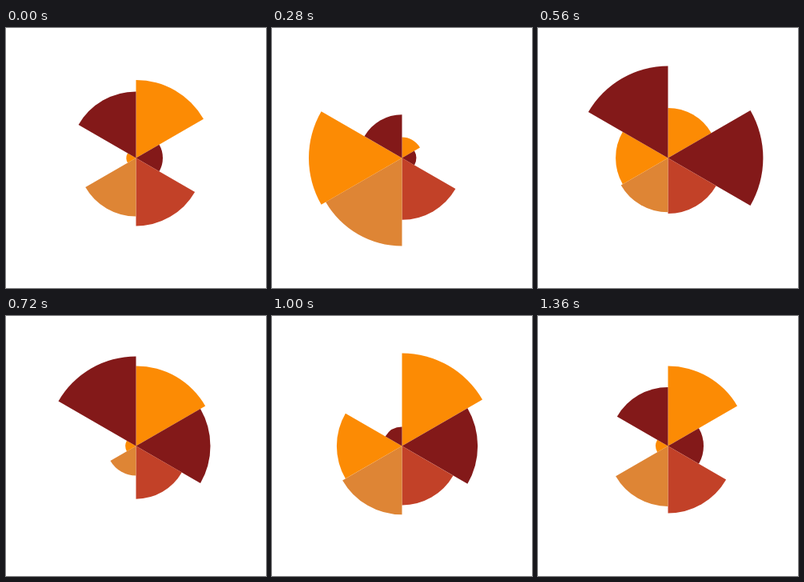
An HTML page that plays this animation: 325x325 px, repeating every 1.4 s.

```html
<!DOCTYPE html>
<html lang="en">
<head>
<meta charset="utf-8">
<title>Pulsing wedges</title>
<style>
  html, body { margin: 0; height: 100%; overflow: hidden; background: #fff; }
  svg { display: block; width: 100vw; height: 100vh; }
</style>
</head>
<body>
<svg viewBox="-162.5 -162.5 325 325"></svg>
<script>
const LOOP = 1400, STEP = 40;

// Clockwise from the top; radii are evenly spaced keys over one loop.
const wedges = [
  { color: '#fc8b04', radii: [97.5, 8, 98.9, 118.9] },
  { color: '#831919', radii: [33.5, 17.8, 118.9, 73.5, 110.4] },
  { color: '#c24128', radii: [85, 65.6] },
  { color: '#de8535', radii: [73, 119.4, 33.5, 94.6] },
  { color: '#fc8b04', radii: [12, 119.2, 105.7, 5, 101.4, 32] },
  { color: '#831919', radii: [83, 40, 111.4, 120.4, 22.6, 27.6] },
];

const svg = document.querySelector('svg');
for (const wedge of wedges) {
  wedge.path = document.createElementNS(svg.namespaceURI, 'path');
  wedge.path.setAttribute('fill', wedge.color);
  svg.append(wedge.path);
}

function radiusAt(radii, progress) {
  const position = progress * radii.length;
  const i = Math.floor(position);
  const next = radii[(i + 1) % radii.length];
  return radii[i] + (next - radii[i]) * (position - i);
}

function point(radius, angle) {
  return `${radius * Math.sin(angle)} ${-radius * Math.cos(angle)}`;
}

function draw(now) {
  const time = Math.floor((now % LOOP) / STEP) * STEP;
  wedges.forEach(({ radii, path }, i) => {
    const r = radiusAt(radii, time / LOOP);
    const start = i * Math.PI / 3;
    const end = start + Math.PI / 3;
    path.setAttribute('d', `M0 0L${point(r, start)}A${r} ${r} 0 0 1 ${point(r, end)}Z`);
  });
}

const origin = performance.now();
function tick() {
  draw(performance.now() - origin);
  requestAnimationFrame(tick);
}
tick();
</script>
</body>
</html>
```
